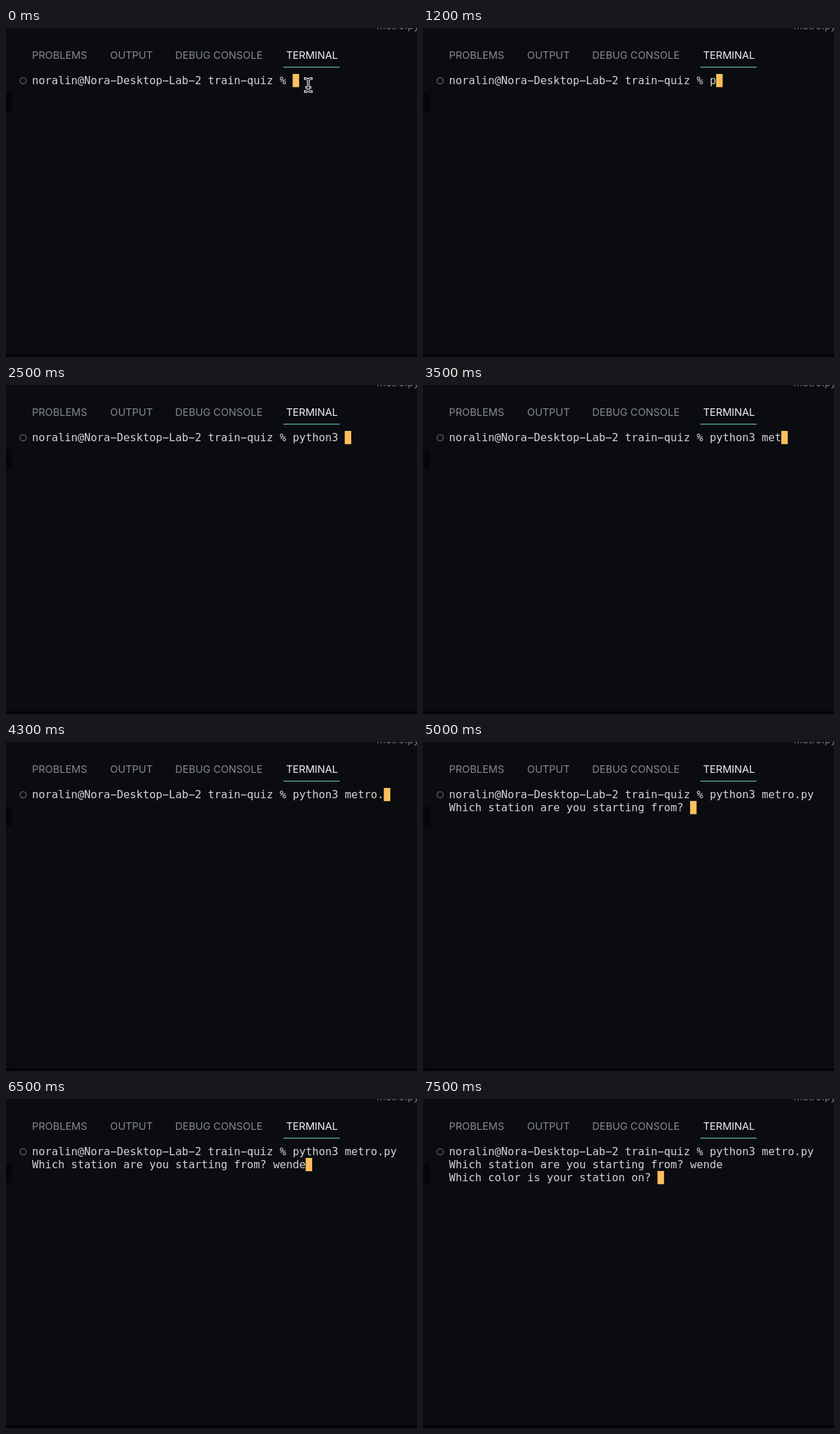
Write an HTML page with a canvas that moves like this. It is 600x480 px and loops after 8000 ms.

```html
<!DOCTYPE html>
<html lang="en">
<head>
<meta charset="utf-8">
<title>Terminal session</title>
<style>
  html, body { margin: 0; width: 100%; height: 100%; overflow: hidden; background: #0a0c10; }
  canvas { display: block; width: 600px; height: 480px; }
</style>
</head>
<body>
<canvas id="stage" width="600" height="480"></canvas>
<script>
const ctx = document.getElementById('stage').getContext('2d');
const LOOP = 8000;
const UI_FONT = '14.9px Inter, sans-serif';
const MONO_FONT = '15.8px "DejaVu Sans Mono", monospace';
const LEFT = 38, FIRST_BASELINE = 82, LINE_HEIGHT = 19;
const POINTER_HIDES = 1200;

const PROMPT = 'noralin@Nora\u2212Desktop\u2212Lab\u22122 train\u2212quiz % ';
const TABS = [['PROBLEMS', 38], ['OUTPUT', 152], ['DEBUG CONSOLE', 247], ['TERMINAL', 409]];

// Each entry appends its text at the given time.
const typed = (text, times) => [...text].map((char, i) => [times[i], char]);
const EVENTS = [
  [0, PROMPT],
  ...typed('python3 ', [1200, 1500, 1600, 1700, 1800, 1900, 2200, 2400]),
  ...typed('metro.py', [3200, 3300, 3500, 3700, 3900, 4300, 4400, 4700]),
  [4900, '\n'],
  [5000, 'Which station are you starting from? '],
  ...typed('wende', [6000, 6100, 6200, 6300, 6400]),
  [6600, '\nWhich color is your station on? ']
];

function rect(color, x, y, w, h) {
  ctx.fillStyle = color;
  ctx.fillRect(x, y, w, h);
}

function label(text, x, y, color, font) {
  ctx.font = font;
  ctx.fillStyle = color;
  ctx.fillText(text, x, y);
}

function drawPanel() {
  rect('#0a0c10', 0, 0, 600, 480);
  rect('#08090d', 0, 13, 600, 1);
  rect('#07080c', 9, 14, 1, 462);
  rect('#050609', 0, 94, 9, 29);
  rect('#040308', 0, 476, 600, 4);

  label('metro.py', 541, 2, '#777982', UI_FONT);
  for (const [name, x] of TABS) {
    label(name, x, 45, name === 'TERMINAL' ? '#f0f1f3' : '#878992', UI_FONT);
  }
  rect('#5fb5a3', 405, 56.5, 82, 1.3);

  ctx.beginPath();
  ctx.arc(25, 77, 4.6, 0, Math.PI * 2);
  ctx.strokeStyle = '#55575b';
  ctx.lineWidth = 1.5;
  ctx.stroke();
}

function drawTerminal(time) {
  const text = EVENTS.filter(([at]) => at <= time).map(([, part]) => part).join('');
  const lines = text.split('\n');
  lines.forEach((line, i) => {
    label(line, LEFT, FIRST_BASELINE + i * LINE_HEIGHT, '#d3d4d5', MONO_FONT);
  });
  const row = lines.length - 1;
  const cursorX = LEFT + ctx.measureText(lines[row]).width;
  rect('#fcbf5c', cursorX, 67 + row * LINE_HEIGHT, 9.5, 19.3);
}

function drawPointer(x, y) {
  const beam = new Path2D(
    'M-4.5-9.5 Q-1-9.5 0-7 Q1-9.5 4.5-9.5 M0-7 V7 ' +
    'M-4.5 9.5 Q-1 9.5 0 7 Q1 9.5 4.5 9.5 M-2.5 3.5 H2.5');
  ctx.save();
  ctx.translate(x, y);
  ctx.lineCap = 'square';
  for (const [color, width] of [['#eeeeee', 3.6], ['#111216', 1.3]]) {
    ctx.strokeStyle = color;
    ctx.lineWidth = width;
    ctx.stroke(beam);
  }
  ctx.restore();
}

function draw(now) {
  const time = now % LOOP;
  drawPanel();
  drawTerminal(time);
  if (time < POINTER_HIDES) drawPointer(441.3, 83.3);
}

const start = performance.now();
function tick() {
  draw(performance.now() - start);
  requestAnimationFrame(tick);
}
tick();
</script>
</body>
</html>
```
